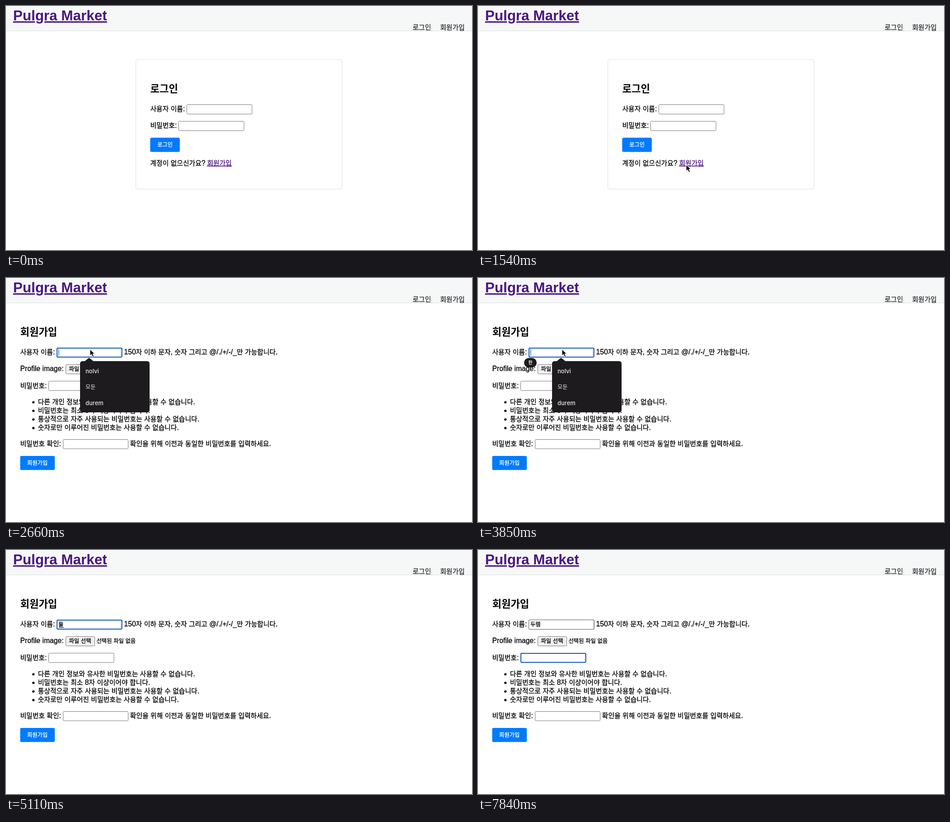
These frames come from a looping animation (1032 px wide and 543 px high, 8000 ms). An HTML page:

```html
<!DOCTYPE html>
<html lang="ko">
<head>
<meta charset="utf-8">
<title>Market</title>
<style>
html, body { margin: 0; width: 100%; height: 100%; overflow: hidden; background: #fff; }
svg { display: block; width: 1032px; height: 543px; }
text {
  font: 15.73px "Liberation Sans", "Noto Sans CJK KR", "Noto Sans CJK", sans-serif;
  white-space: pre; stroke: #000; stroke-width: .3px;
}
.ko { font-size: .942em; }
.h2 { font-size: 23.6px; font-weight: bold; stroke: none; }
.small { font-size: 13.1px; }
.link { fill: #4b1680; stroke: #4b1680; text-decoration: underline; }
.title { font-size: 31.47px; font-weight: bold; stroke: none; }
.nav { fill: #2e3236; stroke: #2e3236; }
.button { fill: #007bff; }
.white { fill: #fff; stroke: #fff; }
.field { fill: #fff; stroke: #767676; }
.used { fill: none; stroke: #585858; }
.focus { fill: none; stroke: #1058b6; stroke-width: 2; }
.caret { fill: #2b6fd6; }
.menu { font: 500 13px Inter, "Noto Sans CJK KR", "Noto Sans CJK", sans-serif; fill: #e8e7e9; stroke: none; }
</style>
</head>
<body>
<svg viewBox="0 0 1032 543">
  <defs>
    <path id="arrow" d="M0 0V14.5L3.4 11.4L6 17L8.8 15.8L6.3 10.4H10.7Z" fill="#000" stroke="#fff" stroke-width="1.1"/>
  </defs>

  <rect width="1032" height="55" fill="#f6f8f8"/>
  <rect y="55" width="1032" height="1" fill="#dcdede"/>
  <text class="link title" x="15.7" y="32">Pulgra Market</text>
  <text class="nav" x="900.5" y="53">로그인</text>
  <text class="nav" x="961.5" y="53">회원가입</text>

  <!-- Login page -->
  <g data-on="0-1680">
    <rect x="287.5" y="119.5" width="457" height="288" rx="4" fill="#fff" stroke="#dfdfdf"/>
    <text class="h2" x="319.5" y="192">로그인</text>
    <text x="319.5" y="234">사용자 이름:</text>
    <rect class="field" x="400.5" y="219.5" width="144.5" height="21" rx="2"/>
    <text x="319.5" y="271">비밀번호:</text>
    <rect class="field" x="382.5" y="256.5" width="144.5" height="21" rx="2"/>
    <rect class="button" x="319.3" y="293" width="65.6" height="31.7" rx="3.5"/>
    <text class="small white" x="335" y="313">로그인</text>
    <text x="319.5" y="354.5">계정이 없으신가요?</text>
    <text class="link" x="445.5" y="354.5">회원가입</text>
    <use href="#arrow" x="461" y="353" data-on="1540-1680"/>
  </g>

  <!-- Sign-up page -->
  <g data-on="1680-8000">
    <text class="h2" x="31.5" y="128">회원가입</text>

    <text x="31.5" y="170">사용자 이름:</text>
    <rect class="field" x="112.5" y="155.5" width="144.5" height="21" rx="2"/>
    <rect class="focus" x="113" y="156" width="143.5" height="20" rx="2" data-on="1680-6650"/>
    <rect class="used" x="112.5" y="155.5" width="144.5" height="21" rx="2" data-on="6650-8000"/>
    <text x="261.5" y="170">150자 이하 문자, 숫자 그리고 @/./+/-/_만 가능합니다.</text>
    <text id="typed" class="small" x="116" y="169.5"></text>
    <rect id="line" x="117" y="172" height="1" data-on="3920-6650"/>
    <rect class="caret" x="116" y="158" width="1.5" height="15" data-on="1680-2100 2660-3220 3780-3920"/>
    <rect class="caret" x="139.5" y="157" width="1.5" height="16" data-on="5250-5880 6440-6650"/>

    <text x="31.5" y="207">Profile image:</text>
    <rect class="focus" x="132" y="192" width="248.5" height="22" rx="2.5" data-on="6650-7280"/>
    <rect x="133" y="193" width="63" height="20" fill="#efefef"/>
    <rect x="132.5" y="192.5" width="64" height="21" rx="2" fill="#efefef" stroke="#767676" data-on="1680-6650 7280-8000"/>
    <rect x="196" y="193" width="1" height="20" fill="#767676" data-on="6650-7280"/>
    <text class="small" x="139.5" y="207">파일 선택</text>
    <text class="small" x="200.5" y="207">선택된 파일 없음</text>

    <text x="31.5" y="244.5">비밀번호:</text>
    <rect class="field" x="94.5" y="229.5" width="144.5" height="21" rx="2"/>
    <rect class="focus" x="95" y="230" width="143.5" height="20" rx="2" data-on="7280-8000"/>
    <rect class="caret" x="98.5" y="232" width="1.5" height="16" data-on="7280-7840"/>
    <g id="rules"></g>

    <text x="31.5" y="373.5">비밀번호 확인:</text>
    <rect class="field" x="126.5" y="359.5" width="144" height="20.5" rx="2"/>
    <text x="274.8" y="373.5">확인을 위해 이전과 동일한 비밀번호를 입력하세요.</text>
    <rect class="button" x="31.4" y="396" width="76.6" height="31.3" rx="3"/>
    <text class="small white" x="47" y="415.5">회원가입</text>

    <g data-on="2660-3920">
      <g fill="#1e1b1f">
        <rect x="164" y="185" width="154" height="114" rx="5.5"/>
        <path d="M174 185.5L182.5 178.5Q184 177.3 185.5 178.5L194 185.5Z"/>
      </g>
      <text class="menu" x="176" y="211.5">nolvi</text>
      <text class="menu" x="176" y="246.5">모둔</text>
      <text class="menu" x="176" y="282.5">durem</text>
      <use href="#arrow" x="186" y="158.5"/>
    </g>
    <g id="bubble" data-on="3640-3920">
      <rect x="-14" y="-10.5" width="28" height="21" rx="10.5" fill="#1b1b1c"/>
      <text class="white" x="0" y="3.7" text-anchor="middle" style="font-size:10.5px">한</text>
    </g>
  </g>
</svg>
<script>
const $ = id => document.getElementById(id);
const hangul = s => s.replace(/[ㄱ-ㅣ가-힣]+/g, '<tspan class="ko">$&</tspan>');

$('rules').innerHTML = [
  '다른 개인 정보와 유사한 비밀번호는 사용할 수 없습니다.',
  '비밀번호는 최소 8자 이상이어야 합니다.',
  '통상적으로 자주 사용되는 비밀번호는 사용할 수 없습니다.',
  '숫자로만 이루어진 비밀번호는 사용할 수 없습니다.'
].map((s, i) => `<circle cx="60.7" cy="${276.6 + i * 19.1}" r="2.6"/>
  <text x="70.7" y="${280.7 + i * 19.1}">${s}</text>`).join('');

document.querySelectorAll('text').forEach(el => el.innerHTML = hangul(el.textContent));

const timed = [...document.querySelectorAll('[data-on]')].map(el => ({
  el, spans: el.dataset.on.split(' ').map(s => s.split('-').map(Number))
}));

const typing = [[0, ''], [3920, 'ㄷ'], [4130, '두'], [4620, 'ㄷ'], [4970, '두'],
  [5110, '둘'], [5250, '두레'], [5390, '두렘']];
let shown = '';

function draw() {
  const t = performance.now() % 8000;
  for (const { el, spans } of timed)
    el.style.display = spans.some(([a, b]) => t >= a && t < b) ? '' : 'none';

  const word = typing.filter(([at]) => t >= at).pop()[1];
  if (word !== shown) $('typed').innerHTML = hangul(shown = word);
  $('line').setAttribute('width', t < 5250 ? 11.5 : 22.5);

  const grow = Math.min(1, Math.max(0, (t - 3640) / 140));
  $('bubble').setAttribute('transform', `translate(116 188.5) scale(${.5 + grow / 2})`);
  $('bubble').setAttribute('opacity', grow);
  requestAnimationFrame(draw);
}
draw();
</script>
</body>
</html>
```
